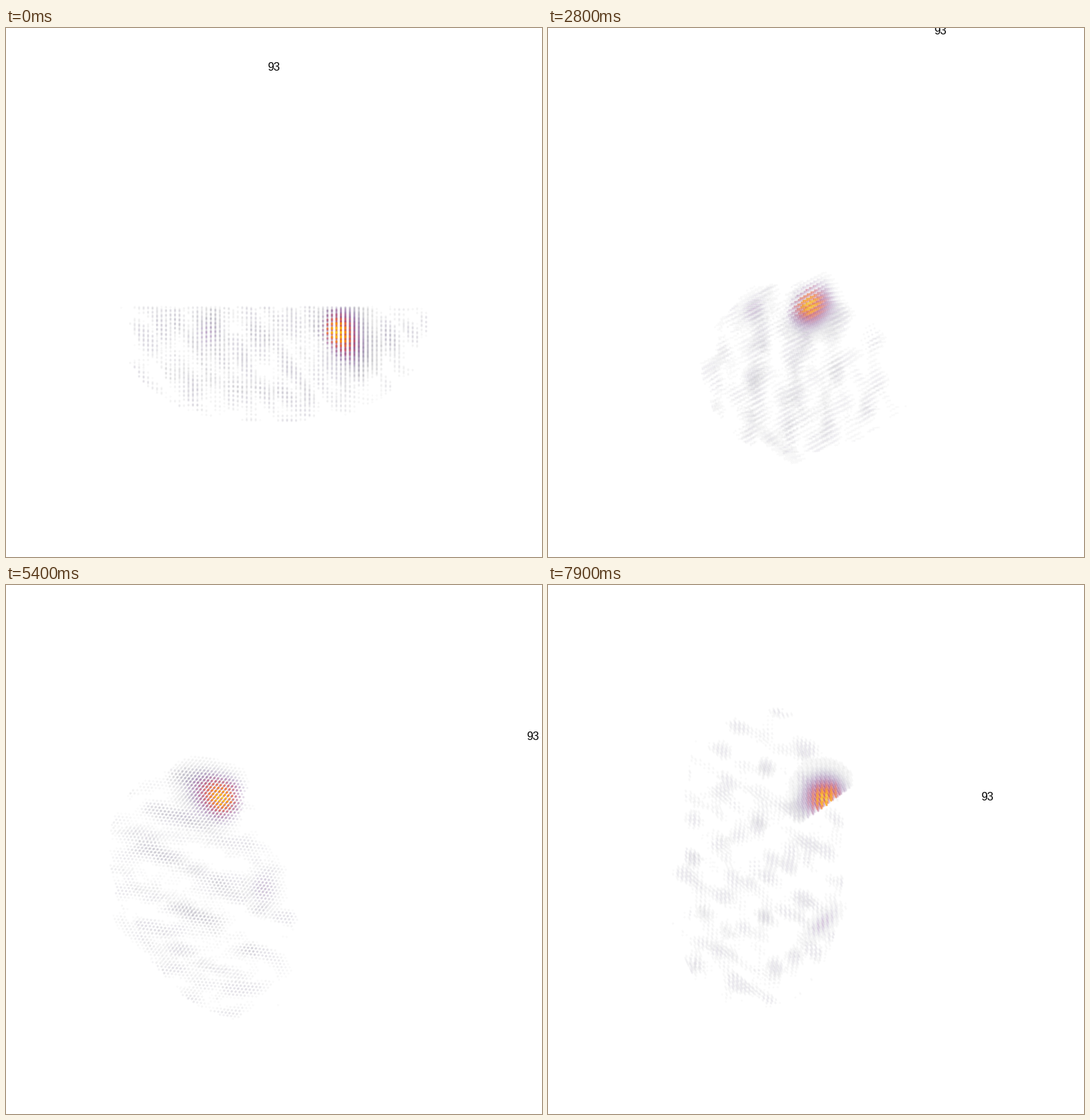
Animation, 753 px wide and 744 px high, one loop 8 s. Source, as a matplotlib script:

```python
import numpy as np
import matplotlib.pyplot as plt
from matplotlib.animation import FuncAnimation

W, H = 753, 744
CX, CY = 376, 372
FRAMES, STEP = 80, 100
PITCH = 6.3
SPEED = np.radians(32)  # per second


def bump(p, centre, spread):
    return np.exp(-0.5 * sum(((a - c) / s) ** 2 for a, c, s in zip(p, centre, spread)))


def texture(p, rng, waves=9):
    """Patchy noise from random plane waves, mostly zero."""
    total = 0
    for _ in range(waves):
        k = rng.normal(size=3)
        k *= 2 * np.pi / rng.uniform(28, 65) / np.linalg.norm(k)
        total = total + np.sin(sum(a * b for a, b in zip(p, k)) + rng.uniform(0, 6.28))
    return np.clip(total / np.sqrt(waves) - 0.55, 0, 1)


def build_cloud():
    rng = np.random.default_rng(93)
    x, y, z = np.meshgrid(np.arange(-36, 37) * PITCH, np.arange(-32, 2) * PITCH,
                          np.arange(-35, 7) * PITCH, indexing="ij")
    y = y + 0.15 * z

    # faint tissue inside half an ellipsoid
    dome = (np.abs(x / 218) ** 2.4 + np.abs((y + 25) / 158) ** 2.4
            + np.abs((z + 88) / 122) ** 2.4)
    value = 0.12 * texture((x, y, z), rng) * (dome < 1)

    # curved band along the back
    s = np.clip((x + 150) / 170, 0, 1)
    band = np.exp(-((y + 112 + 32 * s) / 10) ** 2 - ((z + 128 + 62 * s ** 0.7) / 10) ** 2)
    value += 0.09 * band * ((x > -152) & (x < 35))

    # weak spot, stretched along the diagonal
    a, b = (x + 92 - z + 6) / 1.41, (x + 92 + z - 6) / 1.41
    value += 0.26 * bump((a, y, b), (0, -57, 0), (8, 17, 20))

    # main spot with a leaning tail and a halo, cut off along a slanted face
    depth = np.clip(-57 - y, 0, None)
    lean = x - 0.4 * depth
    core = bump((lean, y, z), (89, -55, 4), (19, np.where(depth > 0, 23, 20), 18))
    halo = bump((lean, y, z), (95, -60, -2), (27, 32, 24))
    face = lean > 75 + 0.75 * z
    value += (0.76 * core + 0.14 * halo) * face

    keep = (value > 0.024) & (y < -20)
    value = np.clip(value[keep], 0, 1)
    order = np.argsort(value)
    pts = np.stack([q[keep] for q in (x, y, z)])[:, order]
    return pts, value[order]


def turn(t):
    """Rotation about a slowly drifting slanted axis."""
    n = np.array([0.73 - 0.029 * t, 0.66, 0.28 + 0.036 * t])
    n /= np.linalg.norm(n)
    a = -SPEED * t
    k = np.array([[0, -n[2], n[1]], [n[2], 0, -n[0]], [-n[1], n[0], 0]])
    return np.eye(3) + np.sin(a) * k + (1 - np.cos(a)) * k @ k


def label_pos(t):
    """Tilted ellipse, slightly bent by perspective."""
    a = SPEED * t
    u = 182 * (1 - np.cos(a)) - 8 * np.sin(a) - 9 * np.sin(2 * a) + 2.6 * np.sin(a) ** 2
    v = 229 + 88 * np.cos(a) + 137.5 * np.sin(a) + 3.5 * np.sin(2 * a)
    return CX + u, CY - v


points, values = build_cloud()
colors = plt.get_cmap("inferno")(values)
colors[:, 3] = np.clip(0.95 * values ** 1.35, 0.018, 0.9)

fig = plt.figure(figsize=((W + 0.01) / 100, (H + 0.01) / 100), dpi=100, facecolor="white")
ax = fig.add_axes([0, 0, 1, 1])
ax.set_xlim(0, W)
ax.set_ylim(H, 0)
ax.axis("off")
dots = ax.scatter(points[0], points[1], s=5, c=colors, linewidths=0)
label = ax.text(0, 0, "93", family="Liberation Sans", fontsize=11.4,
                color="black", ha="center", va="center")


def update(i):
    t = i * STEP / 1000
    u, v, _ = turn(t) @ points
    dots.set_offsets(np.column_stack([CX + u, CY - v]))
    x, y = label_pos(t)
    label.set_position((x, y))
    label.set_visible(bool(y >= 0))
    return dots, label


anim = FuncAnimation(fig, update, frames=FRAMES, interval=STEP,
                     repeat=True, repeat_delay=0, blit=False)
plt.show()
```
